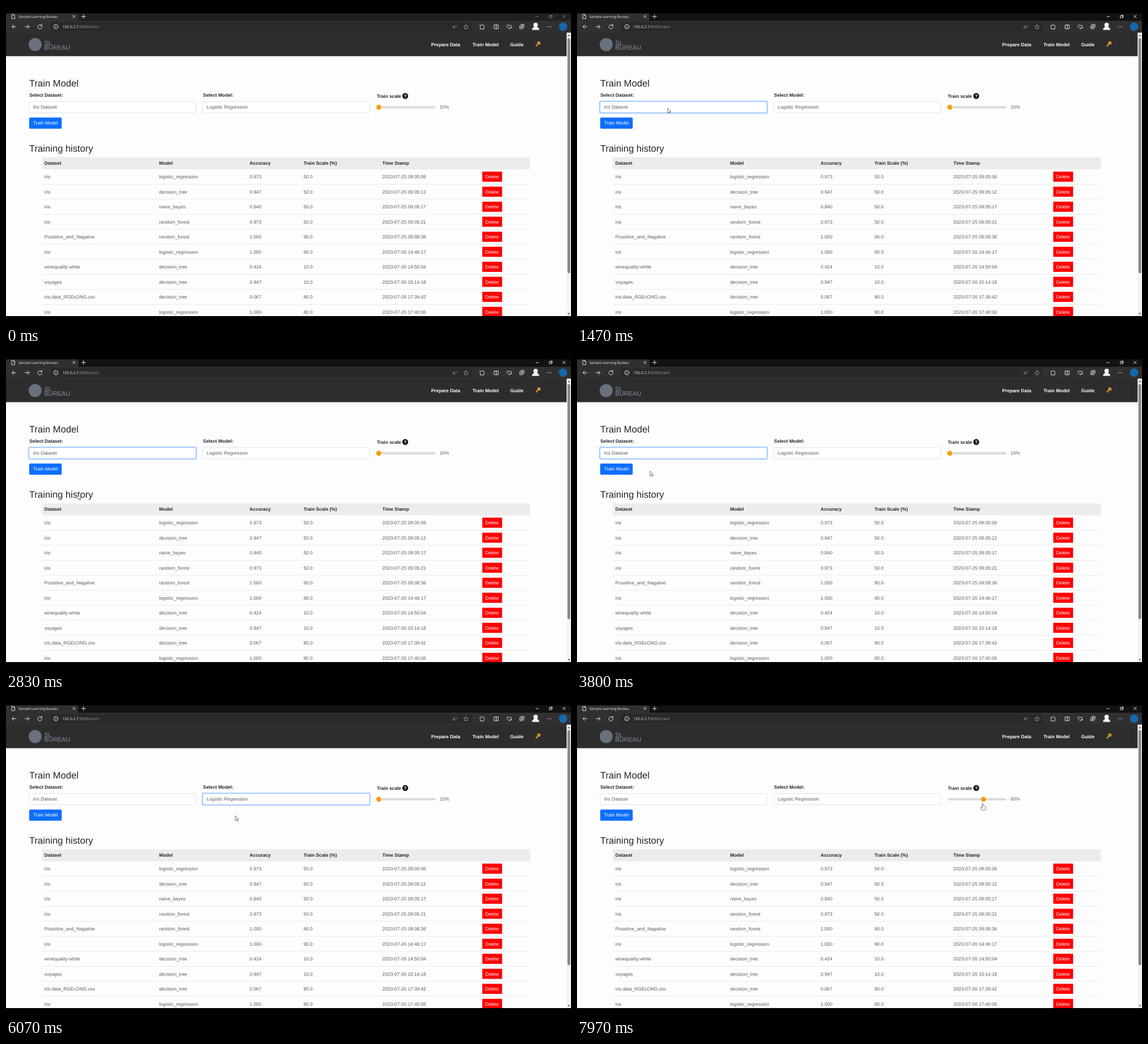
These frames come from a looping animation (998x561 px, 8000 ms). An HTML page:

```html
<!DOCTYPE html>
<html lang="en">
<head>
<meta charset="utf-8">
<title>Train Model</title>
<style>
  html, body { margin: 0; width: 100%; height: 100%; overflow: hidden; background: #000; }
  svg { display: block; width: 100%; height: 100%; }
  text { font-family: "Liberation Sans", Arial, sans-serif; font-size: 8.32px; fill: #565a5e; white-space: pre; text-rendering: geometricPrecision; }
  .b { font-weight: 700; fill: #212529; }
  .h { font-size: 16.63px; fill: #212529; }
  .w { fill: #fff; }
  .nav { font-weight: 700; fill: #fff; }
  .ui { font-family: "Open Sans", sans-serif; font-size: 6.7px; fill: #f4f4f4; }
  .mark { font-size: 11px; fill: #8790a0; }
  .icon { fill: none; stroke: #dedede; stroke-width: 1; stroke-linecap: round; stroke-linejoin: round; }
  .field { fill: #fff; stroke: #ced4da; stroke-width: .7; }
  .focus .field { stroke: #86b7fe; }
  .ring { fill: #b9d5fe; visibility: hidden; }
  .focus .ring { visibility: visible; }
</style>
</head>
<body>
<svg id="stage" viewBox="0 0 998 561" preserveAspectRatio="none">
  <defs><clipPath id="view"><rect y="47" width="998" height="500"/></clipPath></defs>
  <rect width="998" height="561"/>

  <g id="browser">
    <rect id="tabs" y="13" width="998" height="13"/>
    <path d="M0 26V13H124Q128 13 128 17V26Z" fill="#303030"/>
    <rect y="26" width="998" height="21" fill="#303030"/>
    <path class="icon" d="M10.5 14.8h3l2 2v5.5h-5zM13.5 14.8v2h2M118 16.5l4 4m0-4l-4 4M133.5 18.5h7m-3.5-3.5v7"/>
    <text class="ui" x="22" y="20.8" style="font-size:6.1px">Sample Learning Bureau</text>
    <path id="controls" class="icon" d="M936 18.8h4.5M960 17.2h3.6v3.6H960zM961.2 16h3.6v3.6M983.5 16.2l4.6 4.6m0-4.6l-4.6 4.6"/>
    <rect x="79" y="28.5" width="744" height="16" rx="3" fill="#292929"/>
    <path class="icon" d="M18 36.5h-7.5m3.2-3.2l-3.2 3.2 3.2 3.2M33.5 36.5H41m-3.2-3.2l3.2 3.2-3.2 3.2M62.7 34.2a3.7 3.7 0 1 0 .9 2.3M63.4 32v2.7h-2.7"/>
    <circle class="icon" cx="88" cy="36.5" r="3.8"/>
    <path class="icon" d="M88 36.2v2.2M88 34.6v.1"/>
    <text class="ui" x="99.8" y="39">192.0.2.7<tspan fill="#9b9b9b">:8000/train/</tspan></text>
    <text class="ui" x="788.5" y="39.5" style="font-size:8px;fill:#a8a8a8">A<tspan dy="-2.5" font-size="5">))</tspan></text>
    <path class="icon" style="stroke:#a8a8a8;stroke-width:.8" d="M812.6 32.7l1.2 2.5 2.8.4-2 2 .5 2.8-2.5-1.3-2.5 1.3.5-2.8-2-2 2.8-.4z"/>
    <path class="icon" d="M837.5 34h2q1.5-3 3 0H844v2q2 1 0 2.5v2h-6.5v-2q2-1.2 0-2.5zM862.5 33.5h7V40h-7zM866 33v7.5"/>
    <path class="icon" d="M889 40.5l-3.5-3.5q-1.5-3.5 1.5-3.5 1.5 0 2 1.5 1.5-2.5 3.5-.5 1 1-.5 3zM890 38.5h3.5"/>
    <path class="icon" d="M908 34.5h5V40h-5zM909.5 32.5h5.5v5M910.5 36v2.5m-1.2-1.2h2.5"/>
    <g fill="#f4f4f4"><circle cx="935.5" cy="33.5" r="3.9"/><path d="M929.2 42.3q0-5.5 6.3-5.500t6.300 5.500z"/></g>
    <g fill="#dedede"><circle cx="956.4" cy="36.5" r=".8"/><circle cx="959.4" cy="36.5" r=".8"/><circle cx="962.4" cy="36.5" r=".8"/></g>
    <circle cx="984" cy="36.5" r="7.4" fill="#1668a8"/>
  </g>

  <g clip-path="url(#view)">
    <rect y="47" width="998" height="500" fill="#fdfdfd"/>
    <rect y="47" width="990.5" height="41.5" fill="#2d2d2e"/>
    <circle cx="51.5" cy="68" r="11.5" fill="#69717e"/>
    <text class="mark" x="67.5" y="68.6">SL</text>
    <text class="mark" x="67.5" y="76.7">BUREAU</text>
    <g fill="none" stroke="#f5ae25"><circle cx="941.2" cy="65.3" r="1.9" stroke-width="1.9"/><path d="M939.5 67l-4 4m1.3-1.3l1.4 1.3" stroke-width="1.5"/></g>
    <g id="page"></g>

    <rect x="655" y="176.6" width="103.5" height="4.2" rx="2" fill="#dcddd8"/>
    <circle id="thumb" cy="178.6" r="4.3" fill="#ff9800"/>
    <text id="percent" x="766" y="180.8"></text>
    <circle cx="705.2" cy="158.7" r="5.2" fill="#111"/>
    <text class="nav" x="705.2" y="161.7" text-anchor="middle">?</text>

    <rect x="990.5" y="47" width="7.5" height="500" fill="#f3f3f3"/>
    <rect x="991.8" y="56.5" width="4.8" height="415" rx="2.4" fill="#878787"/>
    <path d="M991.8 53.5l2.4-3.5 2.4 3.5zM991.8 541.5l2.4 3.5 2.4-3.5z" fill="#777"/>
  </g>

  <g id="cursor" stroke="#555" stroke-width=".8" stroke-linejoin="round" fill="#fff">
    <path id="arrow" d="M0 0V8.6L2 6.8 3.4 9.8 4.7 9.2 3.4 6.3H6z"/>
    <path id="hand" d="M-1.5 8V1Q-1.5 0-.6 0T.4 1V4.5Q1.5 3.8 2 4.9 3.2 4.3 3.6 5.4 4.9 5 4.9 6.5V9Q4.6 11 3.8 12H-1.3L-4.2 7.8Q-4.3 6.3-2.8 6.9z"/>
  </g>
</svg>

<script>
const LOOP = 8000;
const $ = id => document.getElementById(id);
const page = $('page');

function add(tag, attrs, parent = page) {
  const el = document.createElementNS('http://www.w3.org/2000/svg', tag);
  for (const k in attrs) el.setAttribute(k, attrs[k]);
  parent.append(el);
  return el;
}

function label(x, y, str, cls = '', parent = page) {
  add('text', { x, y, class: cls }, parent).textContent = str;
}

function box(x, y, width, height, fill, rx = 0) {
  add('rect', { x, y, width, height, fill, rx });
}

function select(x, title, value) {
  label(x + .5, 159.8, title, 'b');
  const g = add('g', {});
  add('rect', { x: x - 2, y: 166.7, width: 298.6, height: 23.4, rx: 3.6, class: 'ring' }, g);
  add('rect', { x, y: 168.7, width: 294.6, height: 19.4, rx: 2, class: 'field' }, g);
  label(x + 7, 181, value, '', g);
  return g;
}

label(751, 70.6, 'Prepare Data', 'nav');
label(824, 70.6, 'Train Model', 'nav');
label(890.5, 70.6, 'Guide', 'nav');

label(41, 141.7, 'Train Model', 'h');
const dataset = select(40.8, 'Select Dataset:', 'Iris Dataset');
const model = select(347.6, 'Select Model:', 'Logistic Regression');
label(655, 162.4, 'Train scale', 'b');
box(41, 196.8, 57.4, 19.7, '#0d6efd', 2);
label(48, 209.4, 'Train Model', 'w');
label(41, 257.3, 'Training history', 'h');

const columns = [67.8, 270.5, 430.3, 525.4, 664.8];
const heads = ['Dataset', 'Model', 'Accuracy', 'Train Scale (%)', 'Time Stamp'];
const rows = `iris|logistic_regression|0.973|50.0|2023-07-25 09:05:06
iris|decision_tree|0.947|50.0|2023-07-25 09:05:12
iris|naive_bayes|0.840|50.0|2023-07-25 09:05:17
iris|random_forest|0.973|50.0|2023-07-25 09:05:21
Possitive_and_Nagative|random_forest|1.000|90.0|2023-07-25 09:08:36
iris|logistic_regression|1.000|90.0|2023-07-26 14:46:17
winequality-white|decision_tree|0.424|10.0|2023-07-26 14:50:04
voyages|decision_tree|0.947|10.0|2023-07-26 15:14:18
iris.data_RGEcONG.csv|decision_tree|0.067|80.0|2023-07-26 17:39:42
iris|logistic_regression|1.000|80.0|2023-07-26 17:40:06`.split('\n');

box(63.5, 267, 862, 21.2, '#ececef');
heads.forEach((s, i) => label(columns[i], 280, s, 'b'));
rows.forEach((row, n) => {
  const y = 301 + n * 26.5;
  row.split('|').forEach((s, i) => label(columns[i], y + 3, s));
  box(63.5, y + 13, 862, .7, '#dee2e6');
  box(841.3, y - 8.8, 35, 17.8, '#f00');
  label(846.6, y + 3, 'Delete', 'w');
});

// Pointer stops: time, x, y
const path = [
  [450, 480, 300], [1050, 165, 182], [1470, 160, 180], [1800, 159, 182],
  [2500, 128, 248], [2830, 127, 251.6], [3200, 126, 247], [3700, 129, 211],
  [3800, 129, 210], [4150, 135, 207], [4800, 404, 169.5], [4930, 406, 169],
  [5250, 406, 176], [5650, 405, 212], [6070, 405, 207.5], [6250, 408, 206],
  [6850, 658, 181], [7100, 658, 181], [7850, 717, 186], [LOOP, 717, 186]
];

function pointer(t) {
  let i = 1;
  while (i < path.length - 1 && path[i][0] < t) i++;
  const [t0, x0, y0] = path[i - 1], [t1, x1, y1] = path[i];
  const u = Math.max(0, Math.min(1, (t - t0) / (t1 - t0)));
  const e = u * u * (3 - 2 * u);
  return [x0 + (x1 - x0) * e, y0 + (y1 - y0) * e];
}

function show(el, on) {
  el.setAttribute('visibility', on ? 'visible' : 'hidden');
}

function render(t) {
  const [x, y] = pointer(t);
  const active = t >= 400, visible = t >= 450, overSlider = t >= 6780;
  $('cursor').setAttribute('transform', `translate(${x.toFixed(2)} ${y.toFixed(2)})`);
  show($('arrow'), visible && !overSlider);
  show($('hand'), overSlider);
  $('tabs').setAttribute('fill', active ? '#121212' : '#212121');
  $('controls').setAttribute('opacity', active ? 1 : .45);
  dataset.classList.toggle('focus', t >= 1150 && t < 5200);
  model.classList.toggle('focus', t >= 5200 && t < 6980);

  const step = t < 6980 ? 0 : Math.max(0, Math.min(8, Math.round((x - 658) / 12)));
  $('thumb').setAttribute('cx', 658.4 + step * 11.9);
  $('percent').textContent = 10 + step * 10 + '%';
}

const start = performance.now();
function tick() {
  render((performance.now() - start) % LOOP);
  requestAnimationFrame(tick);
}
tick();
</script>
</body>
</html>
```
